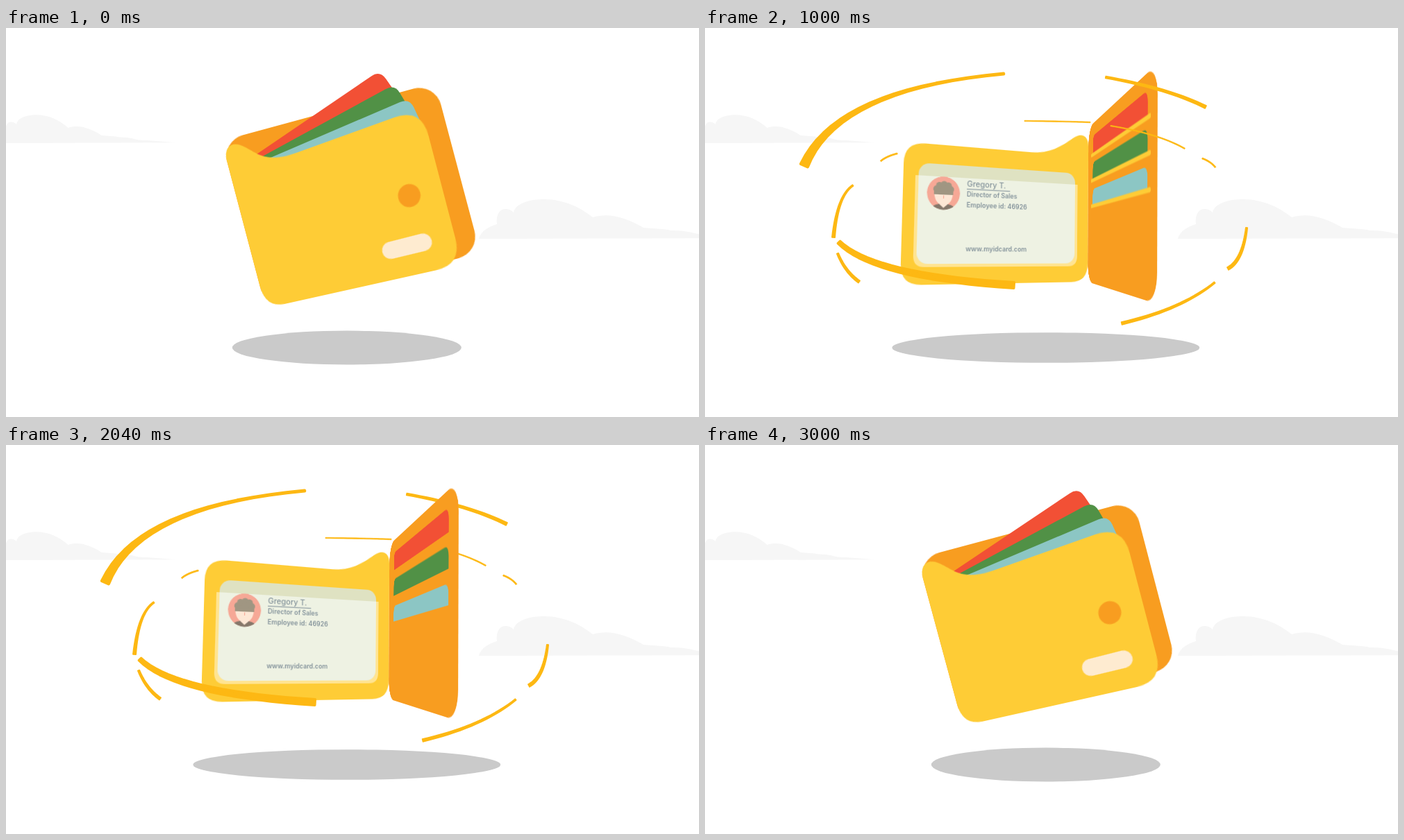
These frames come from a looping animation (998 px wide and 561 px high, 3.04 s). An HTML page:

```html
<!DOCTYPE html>
<html lang="en">
<head>
<meta charset="utf-8">
<title>Wallet</title>
<style>
  html, body { margin: 0; width: 100%; height: 100%; overflow: hidden; background: #fff; }
  #stage { position: relative; width: 998px; height: 561px; overflow: hidden; background: #fff; }
  svg { position: absolute; left: 0; top: 0; overflow: visible; transform-origin: 0 0; }
  .yellow { fill: #fecc36; }
  .orange { fill: #f89d20; }
  .red { fill: #f25035; }
  .green { fill: #519146; }
  .teal { fill: #8cc6c4; }
  .swoosh path { fill: #fdb813; stroke: #fdb813; stroke-linejoin: round; }
  text { font: 600 8.8px Inter, "Open Sans", sans-serif; fill: #84939b; }
  text.name { font-size: 10.6px; font-weight: 500; }
</style>
</head>
<body>
<div id="stage">
  <svg width="998" height="561">
    <path id="cloud" fill="#f6f6f6" d="M681 304Q684 290 707 283Q705 268 714 262Q724 259 731 266C733 254 752 247 774 247C803 247 826 258 845 273C868 266 892 273 918 288C935 290 948 289 957 292C985 292 990 297 1005 298C1040 299 1060 302 1083 303Z"/>
    <use href="#cloud" transform="matrix(.654 0 0 .714 -463 -51)"/>
    <ellipse id="shadow" cx="490.8" cy="461" fill="#cacaca"/>
  </svg>

  <svg id="back" class="swoosh" width="998" height="561"></svg>

  <svg id="rear" width="281" height="218">
    <rect class="orange" width="281" height="218" rx="28"/>
    <g id="pocketCards"></g>
    <g id="slots" class="yellow"></g>
  </svg>

  <svg id="cards" width="998" height="561"></svg>

  <svg id="outer" width="261" height="178">
    <path class="yellow" d="M0 -18C-1 -31 5 -39 15 -38C27 -37 36 -24 50 -13C64 -3 80 0 100 0H229Q261 0 261 32V148Q261 178 231 178H30Q0 178 0 148Z"/>
    <circle class="orange" cx="223" cy="89" r="13"/>
    <rect x="175" y="134" width="60" height="20" rx="10" fill="#feebd0"/>
  </svg>

  <svg id="inner" width="261" height="178">
    <clipPath id="face"><circle cx="51.5" cy="62" r="21.5"/></clipPath>
    <clipPath id="badge"><rect x="19" y="25" width="221" height="127" rx="14"/></clipPath>
    <path class="yellow" d="M27 0H172C200 0 218 -12 236 -25C248 -34 261 -33 261 -15V152Q261 178 235 178H26Q0 178 0 152V27Q0 0 27 0Z"/>
    <path fill="#ffe491" d="M15 41H244V142Q244 156 230 156H29Q15 156 15 142Z"/>
    <g clip-path="url(#badge)">
      <rect x="19" y="25" width="221" height="127" fill="#dfe2c2"/>
      <rect x="19" y="41" width="221" height="111" fill="#eef2e3"/>
    </g>
    <g clip-path="url(#face)">
      <circle cx="51.5" cy="62" r="21.5" fill="#f6a896"/>
      <path fill="#85776a" d="M35 84Q37 77 46 76H57Q66 77 68 84Z"/>
      <path fill="#fde7d5" d="M47 72H56V77L51.5 81L47 77Z"/>
      <path fill="#fde7d5" d="M39.5 60H63.5Q64 75 51.5 79Q39 75 39.5 60Z"/>
      <g fill="#a09682">
        <path d="M39 64V57Q51 42 64 57V64Z"/>
        <circle cx="42.5" cy="57" r="4.5"/><circle cx="60.5" cy="57" r="4.5"/>
        <circle cx="46" cy="52.5" r="4.5"/><circle cx="52" cy="51" r="4.5"/><circle cx="57.5" cy="52.5" r="4.5"/>
      </g>
      <path d="M51.5 65V69" stroke="#f6a896" stroke-width="1"/>
    </g>
    <text class="name" x="82" y="52">Gregory T.</text>
    <path d="M82 55.3H142" stroke="#84939b" stroke-width="1"/>
    <text x="82" y="65.3">Director of Sales</text>
    <text x="82" y="79.2">Employee id: 46926</text>
    <text x="82" y="136">www.myidcard.com</text>
  </svg>

  <svg id="front" class="swoosh" width="998" height="561"></svg>
</div>
<script>
const LOOP = 3040, STEP = 40, NOD = 480, SPIN = 720, OPEN = 1000, FLAT = 1320, COVERED = 1880;
const CX = 490, CY = 255;
const $ = id => document.getElementById(id);
const clamp = x => Math.max(0, Math.min(1, x));
const ramp = (u, from, to) => clamp((u - from) / (to - from));
const easeOut = (p, power) => 1 - Math.pow(1 - p, power);
const mix = (a, b, p) => a + (b - a) * p;
const mixAll = (a, b, p) => a.map((v, i) => mix(v, b[i], p));
const show = (el, on) => { el.style.visibility = on ? "inherit" : "hidden"; };

function add(parent, tag, attrs = {}) {
  const el = document.createElementNS("http://www.w3.org/2000/svg", tag);
  for (const name in attrs) el.setAttribute(name, attrs[name]);
  return $(parent).appendChild(el);
}

// Top and bottom of the hinge, the front cover's free edge and the rear cover's free edge.
const closedPoses = [
  [324, 214, 374, 404, 598, 115, 657, 341, 618, 79, 683, 324],
  [304, 209, 359, 415, 616, 126, 662, 335, 587, 93, 628, 300],
  [317, 195, 365, 420, 610, 139, 640, 333, 553, 102, 590, 320]
];
const openPose = [552, 186, 551, 366, 287, 164, 281, 371, 652, 51, 651, 398];
const flatPose = [488, 184, 488, 359, 227, 182, 227, 360, 769, 139, 769, 360];
// Corner of the first and the last loose card; the middle one lies between.
const tipPoses = [
  [538.5, 61, 581, 101],
  [521, 66, 561, 109],
  [505, 70, 539, 116]
];

// Parabola through three poses at 0, NOD and SPIN.
function sway([a, b, c], u) {
  const wa = (u - NOD) * (u - SPIN) / (NOD * SPIN);
  const wb = u * (SPIN - u) / (NOD * (SPIN - NOD));
  return a.map((v, i) => v * wa + b[i] * wb + c[i] * (1 - wa - wb));
}

const spinAt = u => Math.pow(ramp(u, SPIN, OPEN), 1.3);
const angles = p => [mix(22, 190, p), mix(45, 290, p)].map(a => a * Math.PI / 180);

// Both covers in perspective while the wallet turns about its middle.
function turned(p) {
  const [front, rear] = angles(p), mid = (front + rear) / 2;
  const hx = -100 * Math.cos(mid), hz = -100 * Math.sin(mid);
  const edge = (angle, length, top) => {
    const x = hx + length * Math.cos(angle), s = 900 / (900 + hz + length * Math.sin(angle));
    return [CX + x * s, 265 + top * s, CX + x * s, 265 + 109 * s];
  };
  return [...edge(0, 0, -69), ...edge(front, 261, -69), ...edge(rear, 281, -109)];
}

function pose(u) {
  if (u <= SPIN) return sway(closedPoses, u);
  if (u >= OPEN) return mixAll(openPose, flatPose, easeOut(ramp(u, OPEN, FLAT), 2.5));
  const p = spinAt(u), model = turned(p);
  const base = mixAll(turned(0), turned(1), p), wanted = mixAll(closedPoses[2], openPose, p);
  return model.map((v, i) => v + wanted[i] - base[i]);
}

// Maps a w by h box onto four corners.
function warp(el, w, h, [x0, y0, x1, y1, x2, y2, x3, y3]) {
  const dx1 = x1 - x2, dx2 = x3 - x2, sx = x0 - x1 + x2 - x3;
  const dy1 = y1 - y2, dy2 = y3 - y2, sy = y0 - y1 + y2 - y3;
  const det = dx1 * dy2 - dx2 * dy1 || 1e-6;
  const g = (sx * dy2 - dx2 * sy) / det, k = (dx1 * sy - sx * dy1) / det;
  const m = [
    (x1 - x0 + g * x1) / w, (y1 - y0 + g * y1) / w, 0, g / w,
    (x3 - x0 + k * x3) / h, (y3 - y0 + k * y3) / h, 0, k / h,
    0, 0, 1, 0, x0, y0, 0, 1
  ];
  el.style.transform = `matrix3d(${m.map(v => v.toFixed(8))})`;
}

// 1 when the free edge lies right of the hinge, -1 when left, 0 when edge-on.
function facing(q) {
  const a = q[2] - q[0], b = q[4] - q[6];
  return Math.min(Math.abs(a), Math.abs(b)) < 12 || a * b < 0 ? 0 : Math.sign(a);
}

const looseCards = ["red", "green", "teal"].map((color, i) => {
  const y = 17 + 36.5 * i, foot = 41 + 35 * i;
  add("pocketCards", "path", { class: color, d: `M28 ${foot}V${y + 12}q0 -12 12 -12H242q12 0 12 12V${foot}Z` });
  add("slots", "rect", { x: 18, y: foot - 0.5, width: 245, height: 5, rx: 2.5 });
  return add("cards", "path", { class: color });
});

function cardPath(i, hx, hy, u) {
  const [ax, ay, bx, by] = sway(tipPoses, Math.min(u, SPIN));
  const x0 = hx + 34 + 8 * i, y0 = hy - 30 + 3 * i, tuck = 0.6 * ramp(u, SPIN, 820);
  const x1 = mix(mix(ax, bx, i / 2), x0, tuck), y1 = mix(mix(ay, by, i / 2), y0, tuck);
  const x2 = x1 + mix(50, 32, ramp(u, 0, SPIN)) - 12 * i, y2 = y1 + 72 - 8 * i;
  const toward = (x, y) => {
    const r = 15 / Math.hypot(x - x1, y - y1);
    return `${mix(x1, x, r)} ${mix(y1, y, r)}`;
  };
  return `M${x0} ${y0}L${toward(x0, y0)}Q${x1} ${y1} ${toward(x2, y2)}L${x2} ${y2}L${x0 + 35} ${y0 + 30}Z`;
}

// Start, end, bend toward the outer corner, width.
const swooshes = [
  [143, 198, 430, 66, 0.67, 15],
  [577, 71, 721, 114, 0.25, 6],
  [460, 134, 555, 136, 0.3, 2.2],
  [584, 141, 691, 174, 0.3, 2.5],
  [716, 188, 735, 201, 0.3, 3],
  [277, 181, 253, 192, 0.3, 3],
  [213, 227, 185, 302, 0.6, 6],
  [191, 325, 222, 366, 0.3, 5.5],
  [193, 309, 445, 371, 0.6, 12],
  [600, 426, 734, 367, 0.3, 5.5],
  [780, 288, 753, 347, 0.6, 6]
].map(([x0, y0, x1, y1, bend, width]) => {
  const far = (x, y) => Math.hypot(x - CX, y - CY);
  const [kx, ky] = far(x0, y1) > far(x1, y0) ? [x0, y1] : [x1, y0];
  return {
    x: [x0, mix((x0 + x1) / 2, kx, bend), x1],
    y: [y0, mix((y0 + y1) / 2, ky, bend), y1],
    width, low: Math.max(y0, y1),
    start: width > 10 ? 708 : 760,
    path: add(y0 > 300 ? "front" : "back", "path", { "stroke-width": width * 0.3 })
  };
});

// A tapered stroke that grows from its start, then leaves by its end.
function swooshPath({ x, y, width, low, start }, u) {
  const head = ramp(u, start, start + 220), tail = ramp(u, 1020, 1170);
  if (head <= tail) return "";
  const grown = ramp(u, SPIN, OPEN), scale = mix(0.67, 1, grown) + 0.15 * ramp(u, OPEN, 1160);
  const midY = CY - 31 * (1 - grown), fat = Math.min(1, head * 12);
  const at = ([a, b, c], p) => mix(mix(a, b, p), mix(b, c, p), p);
  const slope = ([a, b, c], p) => mix(b - a, c - b, p);
  const left = [], right = [], n = 18;
  for (let i = 0; i <= n; i++) {
    const p = mix(tail, head, i / n), py = at(y, p);
    const sx = CX + (at(x, p) - CX) * scale, sy = midY + (py - CY) * scale;
    const tx = slope(x, p), ty = slope(y, p);
    const r = width * fat * Math.max(0.02, 0.35 - 0.0027 * (low - py)) / Math.hypot(tx, ty);
    left.push(`${(sx - ty * r).toFixed(2)} ${(sy + tx * r).toFixed(2)}`);
    right.unshift(`${(sx + ty * r).toFixed(2)} ${(sy - tx * r).toFixed(2)}`);
  }
  return `M${left.concat(right).join("L")}Z`;
}

function draw(t) {
  const u = Math.min(t, LOOP - t), spin = spinAt(u), covered = t > COVERED;

  const spread = easeOut(ramp(u, 800, FLAT), 1.75);
  $("shadow").setAttribute("rx", mix(165, 263.5, spread));
  $("shadow").setAttribute("ry", mix(24.5, 19.8, spread));

  const [hx, hy, bx, by, fx, fy, fx2, fy2, rx, ry, rx2, ry2] = pose(u);
  const rise = mix(0.27, 0.235, spin);
  const front = [hx, hy, fx, fy, fx2, fy2, bx, by];
  const rear = [hx + (hx - bx) * rise, hy + (hy - by) * rise, rx, ry, rx2, ry2, bx, by];
  const frontSide = facing(front), rearSide = facing(rear);
  show($("outer"), frontSide > 0);
  show($("inner"), frontSide < 0);
  show($("rear"), rearSide !== 0);
  if (frontSide > 0) warp($("outer"), 261, 178, front);
  if (frontSide < 0) warp($("inner"), 261, 178, [fx, fy, hx, hy, bx, by, fx2, fy2]);
  if (rearSide) warp($("rear"), 281, 218, rear);

  const inside = rearSide > 0 && u > 820;
  show($("pocketCards"), inside);
  show($("slots"), inside && !covered);
  show($("cards"), u < 820);
  looseCards.forEach((card, i) => card.setAttribute("d", cardPath(i, hx, hy, u)));

  const [frontAngle, rearAngle] = angles(spin);
  $("rear").style.zIndex = 3;
  $("cards").style.zIndex = 4;
  $("outer").style.zIndex = $("inner").style.zIndex = Math.sin(frontAngle) < Math.sin(rearAngle) ? 5 : 2;
  $("back").style.zIndex = covered ? 1 : 6;
  $("front").style.zIndex = 7;

  for (const s of swooshes) {
    const d = swooshPath(s, u);
    s.path.setAttribute("d", d);
  }
}

const begin = performance.now();
function tick() {
  const t = (performance.now() - begin) % LOOP;
  draw(Math.floor(t / STEP) * STEP);
  requestAnimationFrame(tick);
}
tick();
</script>
</body>
</html>
```
